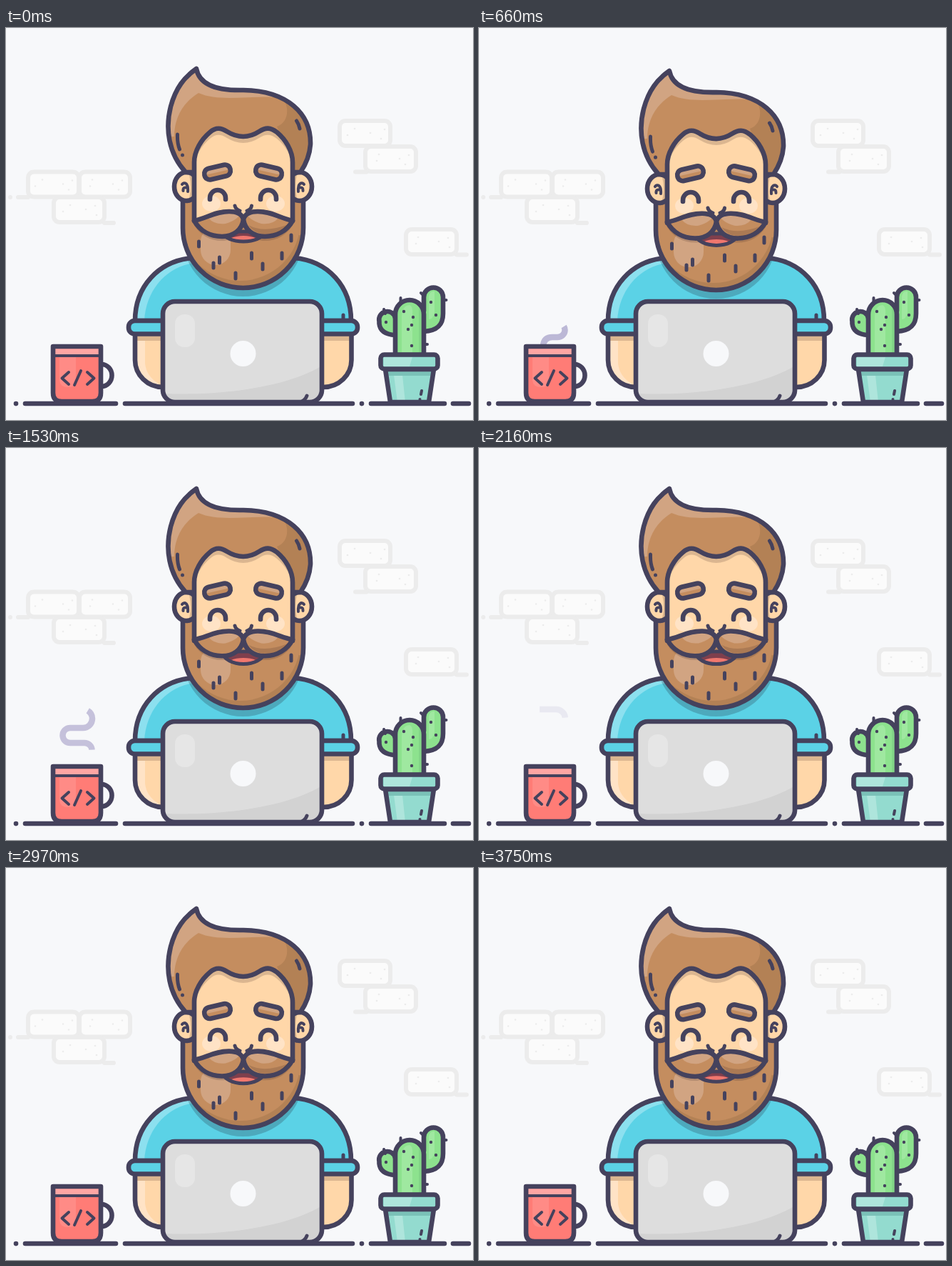
Write an HTML page that moves like this. It is 655 px wide and 549 px high and loops after 3780 ms.

```html
<!DOCTYPE html>
<html lang="en">
<head>
<meta charset="utf-8">
<title>Bearded developer</title>
<style>
html, body { margin: 0; width: 100%; height: 100%; overflow: hidden; background: #f7f8fa; }
svg { display: block; width: 655px; height: 549px; }
.ink { fill: none; stroke: #45425d; stroke-width: 6.6; stroke-linecap: round; stroke-linejoin: round; }
.thin { stroke-width: 5; }
.fine { stroke-width: 4; }
.dot { fill: #45425d; }
.light { fill: #d1a482; }
.dark { fill: #b38155; }
.hair { fill: #c48d5f; }
.skin { fill: #ffd7a9; }
.shade { fill: #45302a; opacity: .2; }
.brick { fill: #fbfbfb; stroke: #ececec; stroke-width: 6; stroke-linecap: round; }
</style>
</head>
<body>
<svg viewBox="0 0 655 549">
  <defs>
    <path id="shirt" d="M181 410C181 362 214 326 262 322H404C452 326 484 362 484 410Z"/>
    <path id="beard" d="M248 230V280A84.500 84 0 0 0 417 280V230Z"/>
    <path id="hair" d="M252 202C228 176 223 141 231 110C238 84 250 69 267 57C271 78 292 88 333 87C395 88 428 120 427 163C426 178 421 190 413 202Z"/>
    <path id="face" d="M264 270V188C264 172 274 156 286 146C294 139 301 139 310 145Q333 159 355 145C364 139 371 139 380 146C392 156 402 172 402 188V270Z"/>
    <path id="stache" d="M264 270C280 267 293 257 313 257C324 257 331 261 333 268C331 283 319 292 303 292C286 292 272 284 264 270Z"/>
    <path id="mouth"/>
    <path id="cup" d="M66 446H133V511Q133 523 121 523H78Q66 523 66 511Z"/>
    <rect id="lid" x="220" y="383" width="223" height="141" rx="17"/>
    <path id="pot" d="M532 478L539 524H593L600 478Z"/>
    <path id="stem" d="M546 458V401a20 20 0 0 1 40 0V458Z"/>
    <path id="twigs" d="M546 406A11.500 11.500 0 0 0 523.500 411V414Q525 429 546 430M586 396V377a13.500 13.500 0 0 1 27 0V400C613 417 604 424 586 425"/>
    <path id="arms" d="M181 428V465A39 38 0 0 0 220 503H445A39.500 38 0 0 0 484.500 465V428"/>
    <rect id="brow" x="-18.5" y="-8" width="37" height="16" rx="7.5"/>
    <clipPath id="cShirt"><use href="#shirt"/></clipPath>
    <clipPath id="cBeard"><use href="#beard"/></clipPath>
    <clipPath id="cHair"><use href="#hair"/></clipPath>
    <clipPath id="cFace"><use href="#face"/></clipPath>
    <clipPath id="cStache"><use href="#stache"/></clipPath>
    <clipPath id="cMouth"><use href="#mouth"/></clipPath>
    <clipPath id="cCup"><use href="#cup"/></clipPath>
    <clipPath id="cLid"><use href="#lid"/></clipPath>
    <clipPath id="cPot"><use href="#pot"/></clipPath>
    <clipPath id="cArms"><use href="#arms"/></clipPath>
    <clipPath id="cBrow"><use href="#brow"/></clipPath>
    <g id="half">
      <use href="#stache" class="hair"/>
      <path class="light" clip-path="url(#cStache)" d="M284 266Q300 255 330 256Q328 268 308 274Q292 276 284 266Z"/>
      <use href="#stache" class="ink"/>
    </g>
    <g id="browArt">
      <use href="#brow" class="hair"/>
      <rect class="light" clip-path="url(#cBrow)" x="-18" y="-8" width="36" height="8"/>
      <use href="#brow" class="ink"/>
    </g>
    <g id="ear">
      <ellipse class="skin" cx="253" cy="222" rx="17" ry="20"/>
      <path class="shade" d="M257 206H264V238H257Q261 222 257 206Z"/>
      <ellipse class="ink" cx="253" cy="222" rx="17" ry="20"/>
      <path class="ink fine" d="M247 219C250 215 256 217 255 229M248.500 228Q248 223 252 223.500"/>
    </g>
  </defs>

  <g id="bricks"></g>
  <path id="steam" fill="none" stroke="#bcb8d6" stroke-width="8.5" d="M90 445Q91 433 103 433H110A10.5 10 0 0 0 110 413H90A10.5 10.5 0 0 1 90 392H108A13 13 0 0 0 108 366H85"/>

  <!-- mug -->
  <path class="ink" d="M134 471A14.5 15.5 0 0 1 134 502"/>
  <use href="#cup" fill="#ff7c76"/>
  <g clip-path="url(#cCup)" fill="#ffa6a3">
    <path d="M66 446H133V458H66Z"/>
    <path d="M75 460H98V494Q98 503 87 503T75 494Z" opacity=".35"/>
  </g>
  <path class="ink fine" d="M68 459H132M88 482L78.500 490.500L88 499M105 480L96 500M114 482L123.500 490.500L114 499"/>
  <use href="#cup" class="ink"/>

  <!-- cactus -->
  <use href="#twigs" fill="#8de28e"/>
  <use href="#twigs" class="ink"/>
  <use href="#stem" fill="#8de28e"/>
  <path fill="#9fe8a0" d="M555 455V403Q556 389 566 388Q571 390 570 400V455ZM593 397V376Q594 368 601 369V398Q599 408 593 408Z"/>
  <path fill="#82d587" d="M579 392L583 397V455H579Z"/>
  <use href="#stem" class="ink"/>
  <path class="ink fine" d="M553.500 378V384M530 394L532 400M614 381H617.500M588 443H591M585 374L582 371"/>
  <g id="spots" class="dot"></g>
  <use href="#pot" fill="#93dbcf"/>
  <g clip-path="url(#cPot)">
    <path fill="#aee5dc" d="M544 486H556L560 524H549Z"/>
    <path fill="#7bc1b8" d="M528 480H604V487H528Z"/>
  </g>
  <use href="#pot" class="ink"/>
  <path class="ink fine" d="M583 508L582 513M580.500 520V520.100"/>
  <rect x="525.500" y="457.500" width="80" height="20" rx="5" fill="#93dbcf"/>
  <path fill="#aee5dc" d="M530 461H570L566 474H530Z"/>
  <rect class="ink" x="525.500" y="457.500" width="80" height="20" rx="5"/>

  <path class="ink" d="M14 526V526.100M27 526H154M167 526H486M499 526V526.100M512 526H615M627 526H649"/>

  <!-- body -->
  <use href="#arms" class="skin"/>
  <g clip-path="url(#cArms)">
    <path fill="#ffe3c6" d="M181 428H195V470Q197 488 214 498V506H181Z"/>
    <path fill="#dbb690" d="M181 430H485V438H181Z"/>
  </g>
  <use href="#arms" class="ink"/>
  <use href="#shirt" fill="#5bd2e6"/>
  <g clip-path="url(#cShirt)">
    <path fill="#8ce0ef" d="M180 411C180 360 214 325 262 322L264 329C226 334 196 366 194 411Z"/>
    <use id="cast" href="#beard" fill="#2a3f50" opacity=".28"/>
  </g>
  <use href="#shirt" class="ink"/>
  <path class="ink thin" d="M473 402V409"/>
  <g id="cuffs"></g>

  <!-- head -->
  <g id="head">
    <use href="#beard" class="dark"/>
    <g clip-path="url(#cBeard)">
      <use href="#beard" class="hair" transform="translate(-4 -10)"/>
      <path class="hair" d="M404 230H417V290H404Z"/>
      <rect class="light" x="273" y="278" width="42" height="54" rx="21"/>
      <g id="castStache" class="shade">
        <use href="#stache"/><use href="#stache" transform="matrix(-1 0 0 1 666 0)"/>
      </g>
    </g>
    <use href="#beard" class="ink"/>
    <path class="ink thin" d="M270.500 299V306M291 329V336M299.500 321V329M322 343V351M344.500 315V323M360 330V338M387 315V323M400 290V298"/>
    <use href="#ear"/>
    <use href="#ear" transform="matrix(-1 0 0 1 665 0)"/>
    <use href="#hair" class="hair"/>
    <g clip-path="url(#cHair)">
      <path class="dark" d="M380 90C400 104 398 132 380 138L402 190V205H430V100Z"/>
      <path class="light" d="M230 152C222 105 245 70 268 54C271 78 290 88 333 87Q368 87 386 97C340 94 300 104 270 91C246 106 236 128 236 152Z"/>
    </g>
    <use href="#hair" class="ink"/>
    <path class="ink thin" d="M240.500 149Q240 161 243.500 170M247.500 178V178.100M407.500 130Q411 135 412 141"/>
    <use href="#face" fill="#dbb690"/>
    <g clip-path="url(#cFace)">
      <use href="#face" class="skin" transform="translate(0 9)"/>
      <g fill="#ffe3c6">
        <ellipse cx="288" cy="246" rx="13" ry="11"/><ellipse cx="378" cy="246" rx="13" ry="11"/>
      </g>
    </g>
    <use href="#face" class="ink"/>
    <path class="ink" d="M286 240V238A11 11 0 0 1 308 238V240M357 240V238A11 11 0 0 1 379 238V240"/>
    <path class="ink thin" d="M321 249Q322 254 328 256M344.500 249Q344 254 338 256"/>
    <g id="browL"><use href="#browArt"/></g>
    <g id="browR"><use href="#browArt"/></g>
    <use href="#mouth" fill="#7f3f4d"/>
    <ellipse id="tongue" clip-path="url(#cMouth)" cx="333" cy="302" rx="25" ry="11" fill="#f0776e"/>
    <use href="#mouth" class="ink thin"/>
    <g id="left"><use href="#half"/></g>
    <g id="right"><use href="#half" transform="matrix(-1 0 0 1 666 0)"/>
      <path class="shade" d="M340 276Q362 288 396 275Q384 289 362 289Q347 287 340 276Z"/></g>
  </g>

  <!-- laptop -->
  <use href="#lid" fill="#ddd"/>
  <path clip-path="url(#cLid)" fill="#d2d2d2" d="M220 512C310 516 400 500 443 473V526H220Z"/>
  <rect x="237" y="401" width="28" height="46" rx="13" fill="#e6e6e6"/>
  <circle cx="332.500" cy="456" r="18" fill="#f7f8fa"/>
  <path class="ink thin" d="M422 515Q420 521 413 524"/>
  <use href="#lid" class="ink"/>
</svg>
<script>
const LOOP = 3780;
const $ = id => document.getElementById(id);
const put = (id, attr, value) => $(id).setAttribute(attr, value);

const bricks = [[31, 201.5], [103, 201.5], [67, 237], [468, 130], [504, 166], [561, 282]];
const specks = [[13, 20], [20, 11], [46, 17], [58, 25], [60, 12]];
$('bricks').innerHTML = bricks.map(([x, y], i) =>
  `<rect class="brick" x="${x}" y="${y}" width="71" height="35" rx="8"/>` +
  specks.map(([a, b], k) => `<circle cx="${x + a + (i * 5 + k * 3) % 7 - 3}" cy="${y + b}" r="1.3" fill="#ececec"/>`).join('')
).join('') +
  '<path class="brick" d="M6 237V237.1M17 237H31M138 273H151M490 201.500H506M632 317.500H646"/>';

const spots = [[558, 397], [571, 405], [569, 416], [564, 422], [569, 445], [533, 412], [596, 384], [603, 402]];
$('spots').innerHTML = spots.map(([x, y]) => `<circle cx="${x}" cy="${y}" r="2.2"/>`).join('');

$('cuffs').innerHTML = [172, 431].map(x =>
  `<rect class="ink" style="fill:#5bd2e6" x="${x}" y="410" width="62" height="18.5" rx="8.5"/>`).join('');

// linear interpolation through [time, value] stops
function track(stops, t) {
  if (t <= stops[0][0]) return stops[0][1];
  for (let i = 1; i < stops.length; i++) {
    const [a, u] = stops[i - 1], [b, v] = stops[i];
    if (t < b) return u + (v - u) * (t - a) / (b - a);
  }
  return stops[stops.length - 1][1];
}

const steamLength = $('steam').getTotalLength();
const steamTip = [[360, 0], [660, 48], [1170, 121], [1530, 163], [1850, 200]];
const steamTail = [[1170, 0], [1530, 43], [1620, 55], [2160, 151], [2300, 200]];
const steamFade = [[1350, 1], [1530, .85], [2160, .25], [2220, 0]];

function draw(t) {
  const bob = t < 1110 ? 3.2 * Math.sin(Math.PI * t / 1110) : 0;
  const smile = Math.pow(Math.sin(Math.PI * t / LOOP), .65);

  put('head', 'transform', `translate(0 ${bob})`);
  put('cast', 'transform', `translate(0 ${12 + bob})`);
  put('castStache', 'transform', `translate(0 ${6 - smile})`);
  const browY = 202 - 2 * smile;
  put('browL', 'transform', `translate(296.500 ${browY}) rotate(-13)`);
  put('browR', 'transform', `translate(368.500 ${browY}) rotate(13)`);
  const lip = 303.5 + 5 * smile;
  put('mouth', 'd', `M303 285C307 ${lip} 359 ${lip} 363 285Z`);
  put('tongue', 'cy', 302 + 3 * smile);
  put('left', 'transform', `rotate(${1.4 * smile} 333 268)`);
  put('right', 'transform', `rotate(${-1.4 * smile} 333 268)`);

  const tip = Math.min(track(steamTip, t), steamLength);
  const tail = Math.min(track(steamTail, t), tip);
  put('steam', 'stroke-dasharray', `0 ${tail} ${tip - tail} 999`);
  put('steam', 'opacity', tip > tail ? track(steamFade, t) : 0);
}

const start = performance.now();
function tick() {
  draw((performance.now() - start) % LOOP);
  requestAnimationFrame(tick);
}
tick();
</script>
</body>
</html>
```
